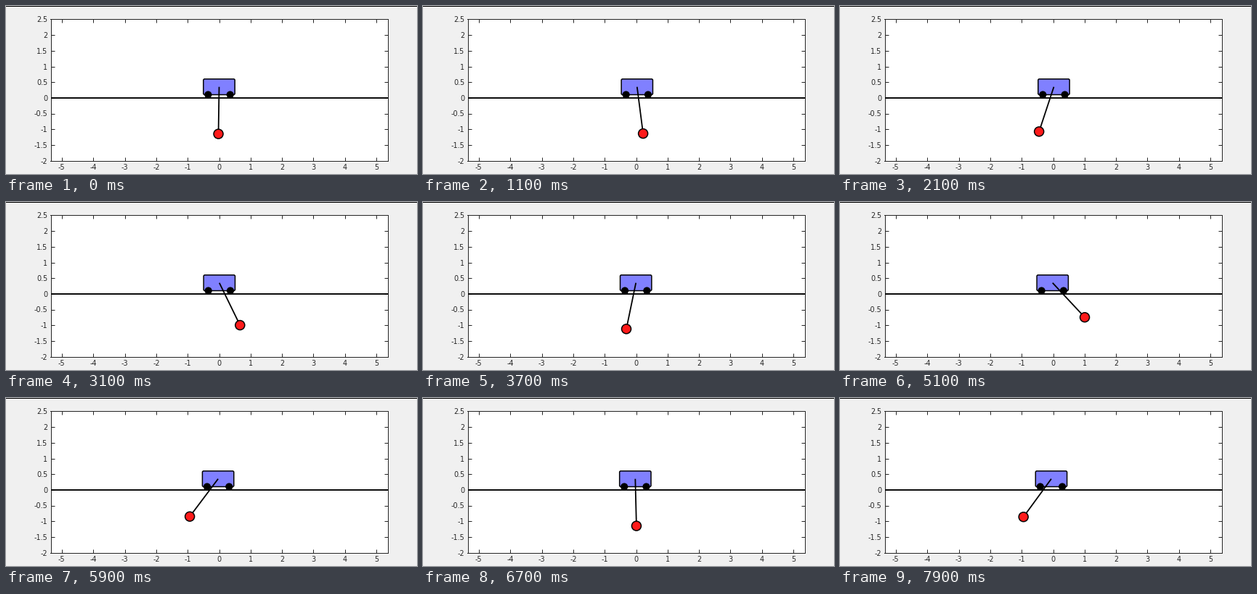
A matplotlib script that plays this animation: 566 by 232 pixels, repeating every 8 s.

```python
import numpy as np
import matplotlib.pyplot as plt
from matplotlib.animation import FuncAnimation
from matplotlib.patches import Circle, FancyBboxPatch, Rectangle

W, H, DPI = 566, 232, 64
PX = 72 / DPI          # points per pixel
SCALE = 43.33          # pixels per metre
FRAMES, STEP = 80, 100

PIVOT_Y, POLE = 0.35, 1.5
CART_W, CART_H, CART_Y = 1.0, 0.5, 0.1
WHEEL_X, WHEEL_R, BALL_R = 0.35, 0.1, 0.15

plt.rcParams["font.family"] = "DejaVu Sans"
fig = plt.figure(figsize=(W / DPI, H / DPI), dpi=DPI, facecolor="#f0f0f0")
fig.add_artist(Rectangle((0, 1 - 1 / H), 1, 1 / H, transform=fig.transFigure,
                         color="black", lw=0))

ax = fig.add_axes([61.5 / W, 18.5 / H, 464 / W, 195 / H])
ax.set(xlim=(-5.354, 5.354), ylim=(-2, 2.5))
xt, yt = np.arange(-5, 6), np.arange(-2, 2.6, 0.5)
ax.set_xticks(xt, [f"{v:g}" for v in xt])
ax.set_yticks(yt, [f"{v:g}" for v in yt])
ax.tick_params(direction="in", top=True, right=True, length=4.6 * PX,
               width=PX, pad=4 * PX, color="#262626", labelcolor="#262626",
               labelsize=9.6 * PX)
for spine in ax.spines.values():
    spine.set(color="#262626", linewidth=PX)

ax.axhline(0, color="black", lw=1.9 * PX, zorder=3)
cart = ax.add_patch(FancyBboxPatch(
    (-CART_W / 2, CART_Y), CART_W, CART_H,
    boxstyle="round,pad=0,rounding_size=0.04",
    fc="#8080ff", ec="black", lw=1.5 * PX, zorder=4, snap=False))


def disc(radius, color, z):
    return ax.add_patch(Circle((0, 0), radius, fc=color, ec="black",
                               lw=1.5 * PX, zorder=z))


wheels = [disc(WHEEL_R, "black", 5) for _ in range(2)]
pole, = ax.plot([], [], color="black", lw=1.8 * PX, zorder=6,
                solid_capstyle="butt")
ball = disc(BALL_R, "#ff1a1a", 7)

# Swing envelope (rad) and phase (half turns) against time (s)
AMP_T = [0, 1.1, 2.05, 3.04, 4.1, 5.06, 6.13, 7.2, 7.9]
AMP = [0.015, 0.13, 0.317, 0.452, 0.602, 0.75, 0.89, 1.05, 1.12]
PHASE_T = [0, 1.05, 2.04, 3.04, 4.08, 4.5, 5.05, 5.4, 6.13, 6.7, 7.18, 7.9]
PHASE = [-4.5, -3.5, -2.5, -1.5, -0.52, -0.14, 0.5, 0.767, 1.5, 2.008,
         2.5, 3.19]


def pose(t):
    """Cart position and pole angle at time t."""
    phase = np.pi * np.interp(t, PHASE_T, PHASE)
    theta = np.interp(t, AMP_T, AMP) * np.sin(phase)
    drift = 2.05 * (1 - np.exp(-t / 0.4)) - 0.54 * t
    sway = 0.4 * min(t / 2, 1) * np.cos(phase)
    return (drift + sway) / SCALE, theta


def update(i):
    x, theta = pose(i * STEP / 1000)
    bx, by = x + POLE * np.sin(theta), PIVOT_Y - POLE * np.cos(theta)
    cart.set_x(x - CART_W / 2)
    for wheel, side in zip(wheels, (-1, 1)):
        wheel.center = x + side * WHEEL_X, CART_Y
    pole.set_data([x, bx], [PIVOT_Y, by])
    ball.center = bx, by
    return cart, *wheels, pole, ball


anim = FuncAnimation(fig, update, frames=FRAMES, interval=STEP,
                     repeat=True, repeat_delay=0, blit=False)
plt.show()
```
